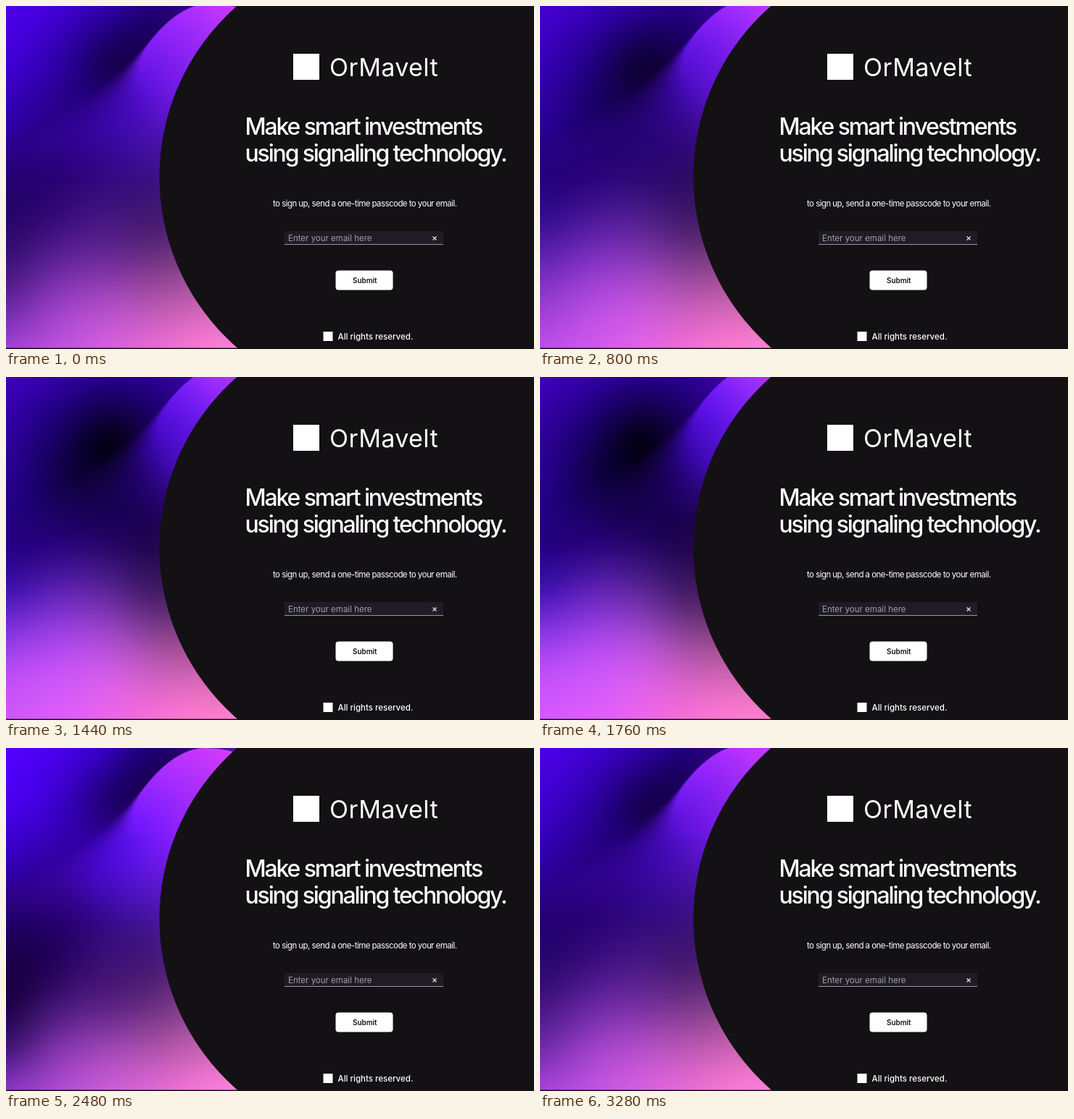
Write an HTML page with a canvas that moves like this. It is 728 px wide and 474 px high and loops after 3.36 s.

```html
<!DOCTYPE html>
<html lang="en">
<head>
<meta charset="utf-8">
<title>Sign up</title>
<style>
  html, body { margin: 0; width: 100%; height: 100%; overflow: hidden; background: #131114; }
  canvas, svg { position: absolute; left: 0; top: 0; display: block; }
  text { font-family: Inter, "Liberation Sans", sans-serif; font-optical-sizing: none; fill: #fff; }
  .brand { font-size: 34px; font-weight: 400; letter-spacing: .4px; }
  .head { font-size: 32px; font-weight: 500; letter-spacing: -2.15px; }
  .sub { font-size: 11.45px; letter-spacing: -.52px; }
  .hint { font-size: 11.5px; fill: #a19da9; }
  .btn { font-size: 9.9px; font-weight: 600; fill: #111; }
  .foot { font-size: 11.5px; font-weight: 500; }
</style>
</head>
<body>
<canvas id="glow" width="320" height="474"></canvas>
<svg width="728" height="474" viewBox="0 0 728 474">
  <g fill="#131114">
    <circle cx="525.5" cy="236" r="314"/>
    <path d="M319 0H728V474H319ZM0 472.5H728V474H0Z"/>
  </g>
  <rect x="396" y="66" width="36" height="36" fill="#fff"/>
  <text class="brand" x="446" y="97">OrMavelt</text>
  <text class="head" x="329.5" y="178">Make smart investments</text>
  <text class="head" x="329.5" y="215">using signaling technology.</text>
  <text class="sub" x="368" y="276.5">to sign up, send a one-time passcode to your email.</text>
  <rect x="384" y="311" width="219" height="18" fill="#1f1c25"/>
  <rect x="384" y="329" width="219" height="1" fill="#9893a3"/>
  <text class="hint" x="389" y="325">Enter your email here</text>
  <path d="M588.5 318.5l5 5m0-5l-5 5" stroke="#e4e2e8" stroke-width="1.2"/>
  <rect x="454.5" y="365.5" width="79" height="27" rx="4" fill="#fff"/>
  <text class="btn" x="478" y="383">Submit</text>
  <rect x="437.5" y="450" width="13" height="13" fill="#fff"/>
  <text class="foot" x="457.5" y="461">All rights reserved.</text>
</svg>
<script>
const W = 320, H = 474, CELL = 4, LOOP = 3360, STEP = 80;

// Colour points: x, y, colour at sway 0, colour at sway 1.
const backdrop = [
  [0, 0, '5500ff', '4000bc'], [70, 0, '4c00f0', '3400ac'],
  [140, 0, '3800c4', '280088'], [215, 0, '1c0068', '2e0098'],
  [0, 70, '4c00f4', '3200a0'], [70, 80, '3c00cc', '180064'],
  [150, 92, '200064', '000002'], [180, 60, '180050', '140050'],
  [0, 150, '3600c0', '2a0094'], [70, 150, '3400a4', '12004c'],
  [130, 150, '3800b4', '0a0030'], [190, 150, '6414f0', '280078'],
  [205, 190, '5a18d0', '1a0048'], [0, 220, '28007c', '22007c'],
  [70, 220, '280078', '240074'], [140, 220, '380c98', '200460'],
  [200, 250, '42148c', '280a54'], [0, 290, '1a0048', '3a10ac'],
  [70, 290, '24005c', '5c20b4'], [140, 290, '3c1078', '582494'],
  [210, 310, '4c1c74', '4c2068'], [0, 350, '180040', '8434e4'],
  [70, 360, '48187c', 'a844ec'], [150, 360, '602484', 'a84ccc'],
  [215, 370, '7c3c88', '9c4c98'], [0, 410, '381070', 'c050f8'],
  [70, 420, '8838b0', 'd058fc'], [150, 420, 'a84cb8', 'dc60e8'],
  [0, 474, '8c38c4', 'd458ff'], [90, 474, 'b850d4', 'e060f8'],
  [180, 474, 'd864d8', 'f46cdc'], [250, 440, 'd868c0', 'ec70c8'],
  [300, 474, 'ff80dc', 'ff80d0']
];
const ridge = [
  [285, 0, 'cc38ff', '9c2eff'], [240, 35, 'b030ff', '6414f0'],
  [205, 85, '8420ff', '4008bc'], [215, 115, '841cff', '3c08b0'],
  [170, 130, '5c10f0', '1c0064'], [205, 160, '701cf0', '280678'],
  [200, 210, '4c14b0', '1c0550']
];

// Sway over time: ms, amount.
const keys = [[0, .32], [480, .5], [1120, .85], [1680, 1], [2080, .88], [2480, 0], [3280, .37], [3360, .39]];

const rgb = hex => [0, 2, 4].map(i => parseInt(hex.slice(i, i + 2), 16));
const smooth = (a, b, v) => {
  const k = Math.min(1, Math.max(0, (v - a) / (b - a)));
  return k * k * (3 - 2 * k);
};
const layer = (w, h) => {
  const c = document.createElement('canvas');
  c.width = w;
  c.height = h;
  const g = c.getContext('2d');
  return { c, g, img: g.createImageData(w, h) };
};

const slope = i => (keys[i + 1][1] - keys[i][1]) / (keys[i + 1][0] - keys[i][0]);
const tangent = i => {
  if (i === 0) return slope(0);
  if (i === keys.length - 1) return slope(i - 1);
  const a = slope(i - 1), b = slope(i);
  return a * b > 0 ? 2 * a * b / (a + b) : 0;
};
function swayAt(t) {
  let i = 0;
  while (i < keys.length - 2 && t >= keys[i + 1][0]) i++;
  const [t0, a] = keys[i], [t1, b] = keys[i + 1];
  const d = t1 - t0, u = (t - t0) / d, v = 1 - u;
  return a * (1 + 2 * u) * v * v + b * u * u * (3 - 2 * u)
    + d * (tangent(i) * u * v * v - tangent(i + 1) * u * u * v);
}

// Multiquadric surface through the points, one weight row per point.
const kernel = (dx, dy) => Math.sqrt(dx * dx + dy * dy + 1200);
function solve(points) {
  const n = points.length;
  const rows = points.map((p, i) => [
    ...points.map((q, j) => kernel(p[0] - q[0], p[1] - q[1]) - (i === j ? 8 : 0)),
    ...rgb(p[2]), ...rgb(p[3])
  ]);
  for (let k = 0; k < n; k++) {
    const pivot = rows[k][k];
    rows[k] = rows[k].map(v => v / pivot);
    for (let i = 0; i < n; i++) {
      if (i === k) continue;
      const f = rows[i][k];
      rows[i] = rows[i].map((v, j) => v - f * rows[k][j]);
    }
  }
  return rows.map(r => r.slice(n));
}

function makeField(points) {
  const w = Math.ceil(W / CELL), h = Math.ceil(H / CELL);
  const { c, g, img } = layer(w, h);
  const weights = solve(points), cells = [];
  for (let i = 0; i < w * h; i++) {
    const x = (i % w + .5) * CELL, y = (Math.floor(i / w) + .5) * CELL;
    const sum = [0, 0, 0, 0, 0, 0];
    points.forEach((p, n) => {
      const k = kernel(x - p[0], y - p[1]);
      for (let m = 0; m < 6; m++) sum[m] += k * weights[n][m];
    });
    cells.push(sum);
  }
  return s => {
    cells.forEach((v, i) => {
      for (let m = 0; m < 3; m++) img.data[i * 4 + m] = v[m] + (v[m + 3] - v[m]) * s;
      img.data[i * 4 + 3] = 255;
    });
    g.putImageData(img, 0, 0);
    return c;
  };
}

// Ridge outline: crisp at the crest, dissolving further down.
const mask = layer(W, H);
function drawMask(s) {
  const bend = Math.pow(Math.max(0, s), 1.5), lift = 18 * bend, crest = 275 + 32 * bend;
  for (let y = 0, o = 3; y < H; y++) {
    const root = Math.sqrt(y + lift + .5), edge = crest - 11.5 * root;
    const norm = Math.hypot(1, 5.75 / root);
    const soft = 1 + .006 * Math.max(0, y - 50 + 25 * s) ** 2;
    const fade = 1 - smooth(110, 250, y);
    for (let x = 0; x < W; x++, o += 4) {
      const side = smooth(-soft, soft, (x - edge) / norm);
      const cap = x > crest + 5 ? smooth(-1, 1, y + lift - ((x - crest - 5) / 15) ** 2) : 1;
      mask.img.data[o] = 255 * side * cap * fade;
    }
  }
  mask.g.putImageData(mask.img, 0, 0);
  return mask.c;
}

const stage = document.getElementById('glow').getContext('2d');
const sheet = layer(W, H);
const backField = makeField(backdrop), ridgeField = makeField(ridge);
const fill = (g, c) => g.drawImage(c, 0, 0, c.width * CELL, c.height * CELL);

function draw(t) {
  const s = swayAt(t), g = sheet.g;
  fill(stage, backField(s));
  g.globalCompositeOperation = 'copy';
  fill(g, ridgeField(s));
  g.globalCompositeOperation = 'destination-in';
  g.drawImage(drawMask(s), 0, 0);
  stage.drawImage(sheet.c, 0, 0);
}

let shown = -1;
function tick() {
  const n = Math.floor(performance.now() % LOOP / STEP);
  if (n !== shown) draw((shown = n) * STEP);
  requestAnimationFrame(tick);
}
tick();
</script>
</body>
</html>
```
